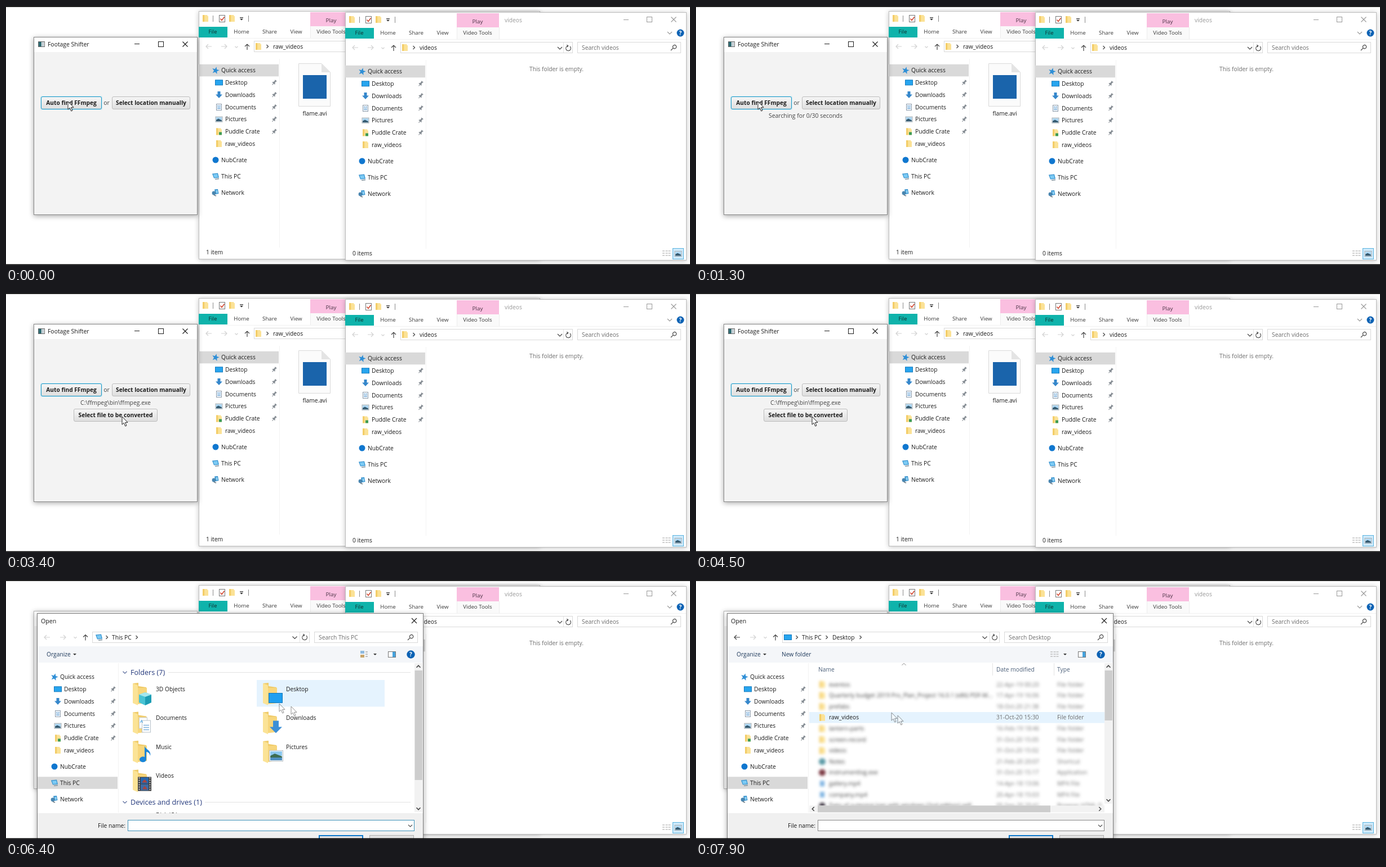
An HTML page that plays this animation: 1214x461 px, repeating every 8 s.

```html
<!DOCTYPE html>
<html lang="en">
<head>
<meta charset="utf-8">
<title>Video conversion demo</title>
<style>
html, body { margin: 0; width: 100%; height: 100%; overflow: hidden; background: #fff; }
svg { display: block; width: 1214px; height: 461px; }
text { font-family: "Open Sans", "Noto Sans", sans-serif; white-space: pre; }
.near { filter: drop-shadow(0 2px 5px rgba(0, 0, 0, .34)); }
.far { filter: drop-shadow(0 1px 4px rgba(0, 0, 0, .24)); }
</style>
</head>
<body>
<svg id="stage" viewBox="0 0 1214 461" xmlns="http://www.w3.org/2000/svg"></svg>
<script>
const LOOP = 8000, STEP = 100;
const INK = '#1c1c1c', GREY = '#6e6e6e', PALE = '#d2d2d2', BLUE = '#1f8fdc';

// Drawing helpers
const rect = (x, y, w, h, fill, line, extra = '') => line
  ? `<rect x="${x + .5}" y="${y + .5}" width="${w - 1}" height="${h - 1}" fill="${fill}" stroke="${line}" ${extra}/>`
  : `<rect x="${x}" y="${y}" width="${w}" height="${h}" fill="${fill}" ${extra}/>`;
const shape = (d, fill) => `<path d="${d}" fill="${fill}"/>`;
const line = (d, color = INK, w = 1, extra = '') => `<path d="${d}" fill="none" stroke="${color}" stroke-width="${w}" ${extra}/>`;
const dot = (x, y, r, fill) => `<circle cx="${x}" cy="${y}" r="${r}" fill="${fill}"/>`;
const text = (x, y, s, { size = 10.25, fill = INK, anchor = 'start', weight = 400, id = '' } = {}) =>
  `<text x="${x}" y="${y + size * .36}" font-size="${size}" fill="${fill}" text-anchor="${anchor}" font-weight="${weight}"${id && ` id="${id}"`}>${s}</text>`;
const mid = (x, y, s, o) => text(x, y, s, { anchor: 'middle', ...o });
const group = (id, body) => `<g id="${id}">${body}</g>`;
const at = (x, y, body) => `<g transform="translate(${x} ${y})">${body}</g>`;

// Controls
const arrow = (x, y, dir, color, id = '') =>
  `<g ${id && `id="${id}"`} transform="translate(${x} ${y}) rotate(${dir})" fill="none" stroke="${color}" stroke-width="1.2"><path d="M-5 0H5M1-4L5 0L1 4"/></g>`;
const chevron = (x, y, dir, color = '#444', s = 3, w = 1.2) =>
  `<path transform="translate(${x} ${y}) rotate(${dir})" d="M${-s / 2} ${-s}L${s / 2} 0L${-s / 2} ${s}" fill="none" stroke="${color}" stroke-width="${w}"/>`;
const caret = (x, y) => shape(`M${x - 3} ${y - 1.5}h6l-3 3z`, '#333');
const cross = (x, y, color) => line(`M${x - 4.5} ${y - 4.5}l9 9m0-9l-9 9`, color, 1.1);
const refresh = (x, y) => line(`M${x + 3} ${y - 3}a4.4 4.4 0 1 1-4-1m-1.8-1.8l2.6 1.6l-1.8 2.4`, '#444', 1.1);
const lens = (x, y) => line(`M${x - 5} ${y + 5}l4.2-4.2a3.2 3.2 0 1 1 .3.3`, '#444', 1.2);
const help = (x, y, r) => dot(x, y, r, '#0b62b4') + mid(x, y, '?', { size: 10, fill: '#fff', weight: 700 });
const listIcon = (x, y) => [-4, 0, 4].map(d => line(`M${x - 7} ${y + d}h4m1.5 0h4m1 0h4`, '#a2a2a2', 1.2)).join('');
const button = (x, y, w, s, focus) =>
  (focus ? rect(x - 1, y - 1, w + 2, 25, '#cdeaf5', '', 'rx="3"') : '') +
  rect(x, y, w, 23, 'url(#btn)', focus ? '#1b97c4' : '#bcbcbc', 'rx="2.5"') +
  mid(x + w / 2, y + 11.5, s, { size: 10.2, weight: 700 });

// Small icons, drawn round their centre
const icon = {
  folder: () => shape('M-5-6h8.5v2h1.5v10H-5z', '#fbe296') + shape('M-5-6h3.2v12H-5z', '#f3cd68'),
  star: () => `<g transform="rotate(14)">${shape('M0-6.4L1.7-2L6.4-1.9L2.7 1.1L4 5.8L0 3.1L-4 5.8L-2.7 1.1L-6.4-1.9L-1.7-2z', '#2f8fd6')}</g>`,
  desktop: () => rect(-7, -5, 14, 10, '#27a5ef', '#1278bd'),
  down: () => shape('M-2.5-6h5V-.5H6L0 6L-6-.5h3.5z', '#3587cb'),
  page: () => rect(-5, -6, 10, 12, '#f8fafc', '#8c9bab') + line('M-3-2.5h2.5m1 0h2.5M-3 0h6M-3 2.5h6', '#4d93cf', 1.2),
  picture: () => rect(-6.5, -5, 13, 10, '#fff', '#9aa5ad') + rect(-5, -3.5, 10, 7, '#a9d5f2') + shape('M-5 3.5V1l4-2.2L5 1.8v1.7z', '#33596f'),
  share: () => icon.folder() + rect(0, 1, 5, 5, '#3d9b55'),
  cloud: () => dot(0, 0, 5.5, '#0f77cf'),
  pc: () => shape('M-6-4.5L4-5.5L6 2.5L-3 3.5z', '#2d8ccb') + shape('M-4.5-3.4L3.2-4.2L4.6 1.6L-2.3 2.4z', '#7ccaf4') + line('M-1 5.2L6 4.4', '#8395a1', 1.6),
  net: () => shape('M-2-5.5L4-6L5.5 2L0 3z', '#2d8ccb') + shape('M0-4L3.4-4.3L4.3 1L1 1.5z', '#8ed0f2') + dot(-3, 1, 3.4, '#4a86b0') + line('M-3 4.5L1 6', '#6c7a84', 1.5),
  film: () => rect(-4, -5, 8, 10, '#7fb4e2'),
  web: () => dot(0, 0, 6, '#5b9aa6'),
  app: () => dot(0, 0, 6, '#7c3a44'),
  dark: () => dot(0, 0, 5.5, '#453d4a')
};
const put = (name, x, y) => at(x, y, icon[name]());
const pin = y => `<g transform="translate(476 ${y}) rotate(40)">${shape('M-2-5h4v1l-.7.6v2.6L3 1v1H.5v3.4h-1V2H-3V1l1.7-1.8v-2.6L-2-4z', '#858c93')}</g>`;

// Navigation pane shared by folder windows and the dialog
const places = [
  ['Quick access', 'star', 114.5], ['Desktop', 'desktop', 136.3, 1], ['Downloads', 'down', 158, 1],
  ['Documents', 'page', 180, 1], ['Pictures', 'picture', 201.7, 1], ['Puddle Crate', 'share', 223.5, 1],
  ['raw_videos', 'folder', 245, 2], ['NubCrate', 'cloud', 274], ['This PC', 'pc', 303], ['Network', 'net', 332]
];
const nav = active => places.map(([name, ic, y, deep]) =>
  (name === active ? rect(342, y - 10.7, 142, 21.5, '#d9d9d9') : '') +
  put(ic, deep ? 378 : 372, y) + text(deep ? 389 : 382, y, name) + (deep === 1 ? pin(y) : '')).join('');

const explorer = (name, status) =>
  rect(342, 9, 606, 442, '#fff', '#bcbcbc', 'class="far"') +
  put('folder', 354, 22) + line('M367.5 17v11M430.5 17v11', '#8a8a8a') +
  rect(378, 16, 11, 13, '#fff', '#777') + line('M380.5 22.5l2.5 3l4.5-6', '#d1452f', 1.6) +
  put('folder', 401, 22) + line('M415 20.5h6') + caret(418, 24) +
  rect(540, 36, 75, 21, '#fafafa') + line('M540.5 36v21M615.5 36v21', '#ececec') +
  rect(540, 11, 75, 25, '#fabfe0') + mid(577, 25, 'Play', { size: 9.8, fill: '#4a3344' }) +
  text(625, 23, name, { fill: '#9a9a9a' }) +
  line('M836 22.5h9', '#999') + rect(877, 17, 10, 10, 'none', '#999') + cross(925, 22, '#999') +
  rect(342, 37, 51, 19, '#0fb3ab') + mid(367, 46, 'File', { size: 9.4, fill: '#102a2a' }) +
  [[418, 'Home'], [468, 'Share'], [515, 'View'], [577, 'Video Tools']].map(([x, s]) => mid(x, 46, s, { size: 9.7, fill: '#3a3a3a' })).join('') +
  chevron(918, 46, 90, '#999', 4) + help(937, 46, 6.5) + line('M343 57.5h604', '#f1f1f1') +
  arrow(360, 72, 180, PALE) + arrow(387, 72, 0, PALE) + chevron(409, 73, 90, PALE, 2.5) + arrow(428, 73, -90, '#444') +
  rect(440, 62, 306, 20, '#fff', '#d9d9d9') + line('M729.5 63v18', '#e3e3e3') +
  put('folder', 448, 72) + chevron(464, 72, 0) + text(474, 72, name) +
  chevron(723, 73, 90, '#444', 4) + refresh(738, 73) +
  rect(754, 62, 184, 20, '#fff', '#d9d9d9') + text(762, 72.5, 'Search ' + name, { fill: GREY }) + lens(925, 72) +
  nav('Quick access') + line('M485.5 94v336', '#f3f3f3') +
  text(355, 438.5, status) + listIcon(912, 438) +
  rect(923, 429, 20, 20, '#cfeafb', '#58b3df') + put('picture', 933, 439);

const flame =
  `<path d="M519.5 102.5H560L575.5 118V178.5H519.5Z" fill="#fbfbfb" stroke="#dadada"/>` +
  shape('M560 102.5V118h15.5z', '#e4e4e4') + rect(527, 123, 42, 42, '#1a64ab') +
  mid(548, 191.5, 'flame.avi');

const mainWin =
  rect(49, 55, 291, 317, '#f3f3f3', '#858585', 'id="frame" class="near"') + rect(50, 56, 289, 26, '#fff') +
  rect(57, 63, 12, 10, '#fff', '#666') + rect(58, 64, 5, 8, '#2e6b73') + rect(64, 64, 3, 8, '#b8c4cb') +
  text(74, 68, 'Footage Shifter', { size: 10.4 }) +
  line('M228 67.5h9') + rect(270, 63, 10, 10, 'none', INK) + cross(318, 68, INK) +
  button(62, 161, 108, 'Auto find FFmpeg', true) + mid(178.5, 172.5, 'or', { size: 10.4, fill: '#444' }) +
  button(188, 161, 139, 'Select location manually') +
  mid(194.5, 195, '', { size: 10.4, fill: '#444', id: 'status' }) +
  group('pick', button(120, 206, 149, 'Select file to be converted'));

// Dialog contents
const heading = (y, s, x) => chevron(211, y, 90, '#5a6b9c', 3.5) + text(221, y, s, { size: 12.6, fill: '#24397c' }) + line(`M${x} ${y}H718`, '#e2e2e2');
const bigFolder = shape('M0 1L10 0v6l14 2v28L3 37L0 35z', '#efca67') + shape('M0 1l9 3v36L0 36z', '#fbe396') + shape('M9 9h16v27l-16 2z', '#f7d67c');
const overlay = {
  '3D Objects': shape('M22 17l11 4v14l-11 5l-11-5V21z', '#49c3d4') + shape('M22 25l11-4v14l-11 5z', '#1d9db4') + shape('M22 17l11 4l-11 4l-11-4z', '#a5e7ee'),
  Desktop: rect(10, 18, 25, 18, '#1f9ff0', '#1478ba'),
  Documents: rect(11, 10, 15, 20, '#fff', '#c3ccd4') + rect(16, 15, 16, 22, '#fff', '#b6c1ca') + text(13, 17, 'A', { size: 8, fill: BLUE }) + line('M19 24h10M19 28h10M19 32h10', '#7fb2dc', 1.5),
  Downloads: shape('M18 16h10v11h6L23 38L12 27h6z', '#3d8fd6'),
  Music: shape('M21 9c1 7 12 7 10 18c-1-5-4-7-7-7v13a6 5 0 1 1-3-4z', '#1a86d9'),
  Pictures: rect(11, 17, 25, 20, '#fff', '#b4bdc3') + rect(13, 19, 21, 8, '#8dc8ef') + shape('M13 27l8-4l13 5v3H13z', '#3d6d52') + rect(13, 30, 21, 5, '#4f8fc0'),
  Videos: rect(9, 13, 24, 25, '#3a3a3a') + line('M11.5 14v23M30.5 14v23', '#ddd', 2, 'stroke-dasharray="2 2"') + rect(14, 14, 14, 11, '#2767ad') + rect(14, 26, 14, 11, '#3f6ba3') + shape('M16 23l5-6l5 6zM17 35l4-6l5 6z', '#a8443e')
};
const tiles = Object.keys(overlay).map((name, i) => {
  const x = i % 2 ? 456 : 225, y = 183 + 51.5 * (i >> 1);
  return at(x, y, bigFolder + overlay[name]) + text(x + 41, y + 11, name);
}).join('');
const vbar = (h, thumb, ends) => rect(725, 148, 14, h, '#f2f2f2') + rect(725.5, 161, 13.5, thumb, '#cdcdcd') +
  (ends ? chevron(732, 154, -90, '#444', 3.5, 1.6) + chevron(732, 148 + h - 6, 90, '#444', 3.5, 1.6) : '');
const folders = heading(164.5, 'Folders (7)', 288) + group('hover', rect(445, 178, 227, 47.5, '#e5f3fe')) + tiles +
  heading(395.5, 'Devices and drives (1)', 353) +
  `<g clip-path="url(#pane)">${text(266, 418.5, 'Disk (C:)')}</g>` + vbar(265, 195, true);

const columns = [[217, 'Name'], [533, 'Date modified'], [641, 'Type']].map(([x, s]) => text(x, 159, s, { fill: '#4c607a' })).join('') +
  line('M526.5 148v22M635.5 148v22', '#e3e3e3') + chevron(369, 150, -90, '#888', 3.5, 1);

const kinds = { folder: 'File folder', web: 'Shortcut', app: 'Application', film: 'MP4 File', dark: 'Browser HTML D' };
const files = [
  ['eventos', 'folder', '22-Apr-19 00:20'], ['Quarterly budget 2019 Pro_Plan_Project 16.0.1 (x86) PDF-M...', 'folder', '17-Apr-19 16:06'],
  ['prefabs', 'folder', '18-Oct-20 21:38'], ['raw_videos', 'folder', '31-Oct-20 15:30'],
  ['lantern-parts', 'folder', '16-Feb-19 18:46'], ['screen-record', 'folder', '31-Oct-20 15:05'], ['videos', 'folder', '31-Oct-20 15:02'],
  ['Notes', 'web', '21-Feb-20 20:07'], ['instrumentlog.exe', 'app', '31-Oct-20 15:17'],
  ['gallery.mp4', 'film', '14-Apr-18 13:06'], ['company.mp4', 'film', '20-Apr-18 15:03'],
  ['Data of outgoing logs with windows (2nd edition) self...', 'dark', '05-Sep-20 20:41']
];
const fileRow = ([name, kind, date], i) => {
  const y = 186 + 19.6 * i, clear = name === 'raw_videos', o = { fill: clear ? GREY : '#777' };
  const row = put(kind, 224, y) + text(236, y, name, { fill: clear ? INK : '#444' }) + text(533, y, date, o) + text(641, y, kinds[kind], o);
  return clear ? rect(201, y - 9.8, 524, 19.6, '#e5f3fe') + row : `<g filter="url(#soft)">${row}</g>`;
};
const hbar = (y, w) => rect(201, y, w, 12, '#f2f2f2') + rect(216, y, 413, 12, '#cdcdcd') + chevron(208, y + 6, 180, '#444', 3.5, 1.6) + chevron(717, y + 6, 0, '#555', 3.5, 1.6);

const dialog =
  rect(55, 59, 686, 440, '#fff', '#7c7c7c', 'class="near"') +
  text(62, 73, 'Open', { size: 10.6 }) + cross(724.5, 72.5, INK) +
  arrow(73, 102, 180, PALE, 'back') + arrow(101, 102, 0, PALE) + chevron(123, 102.5, 90, PALE, 2.5) + arrow(141, 102.5, -90, '#444') +
  rect(153, 92, 386, 20, '#fff', '#d9d9d9') + line('M521.5 93v18', '#e3e3e3') +
  group('pcIcon', put('pc', 165, 102)) + group('deskIcon', put('desktop', 163, 102)) +
  chevron(179, 102, 0) + text(188, 102, 'This PC') + group('more', chevron(232, 102, 0)) +
  group('crumb', text(242, 102, 'Desktop') + chevron(292, 102, 0)) +
  chevron(512.5, 102.5, 90, '#444', 4) + refresh(530, 102) +
  rect(547, 92, 184, 20, '#fff', '#d9d9d9') + text(555, 102.5, '', { fill: GREY, id: 'search' }) + lens(718, 102) +
  rect(56, 118, 684, 29, '#f4f6f9') + text(72, 132.5, 'Organize', { fill: '#1e395b' }) + caret(122, 132.5) +
  group('newDir', text(152, 132.5, 'New folder', { fill: '#1e395b' })) +
  group('tileIcon', rect(629, 126, 7, 5, '#8fbbe0') + rect(629, 133, 7, 5, '#c9a56a') + line('M638 128h4M638 132h4M638 136h4', '#888')) +
  group('rowIcon', listIcon(636, 132)) + caret(655, 132.5) +
  rect(678, 127, 14, 11, '#fff', '#777') + rect(686, 128, 5, 9, '#46a3de') + help(718.5, 132.5, 7.2) +
  at(-286, 58, nav('This PC')) + line('M199.5 148v266', '#f3f3f3') +
  group('tiles', folders) + group('head', columns) +
  group('pending', rect(725.5, 162, 14, 222, '#f6f6f6') + rect(725.5, 162, 14, 88, '#d5d5d5') + hbar(401.5, 538) + rect(629, 401.5, 25, 12, '#e2e0de') + chevron(732, 407.5, 0, '#444', 3.5, 1.6)) +
  group('list', `<g clip-path="url(#rows)">${files.map(fileRow).join('')}</g>` + vbar(250, 89, true) + hbar(401.5, 524)) +
  mid(470.5, 168.5, 'Working on it...', { fill: GREY, id: 'wait' }) +
  rect(56, 415, 684, 60, '#f0f0f0') + text(212, 437, 'File name:', { anchor: 'end' }) +
  rect(216, 427, 509, 20, '#fff', '#3c91b8', 'id="field"') + chevron(717.5, 437.5, 90, '#555', 3.5) +
  group('caret', line('M219.5 430v14')) +
  rect(555.5, 454.5, 78, 20, '#e4e4e4', '#0d78cc', 'stroke-width="2"') + rect(645, 454, 79, 20, '#e1e1e1', '#b0b0b0');

const pointer = id => `<path id="${id}" d="M0 0V14.2L3.2 11.2L5.7 17L8 16L5.6 10.4H10Z" fill="#fff" stroke="#222"/>`;

const stage = document.getElementById('stage');
stage.innerHTML = `<defs>
  <linearGradient id="btn" x2="0" y2="1"><stop stop-color="#f6f6f6"/><stop offset="1" stop-color="#dedede"/></linearGradient>
  <filter id="soft" x="-5%" y="-60%" width="110%" height="220%"><feGaussianBlur stdDeviation="2.8"/></filter>
  <clipPath id="pane"><rect x="200" y="147" width="525" height="268"/></clipPath>
  <clipPath id="rows"><rect x="200" y="171" width="525" height="231"/></clipPath></defs>` +
  rect(0, 0, 1214, 461, '#fff') + explorer('raw_videos', '1 item') + flame +
  at(260, 2, explorer('videos', '0 items')) + mid(977, 112.5, 'This folder is empty.', { fill: GREY }) +
  mainWin + group('dialog', dialog) + pointer('trail') + pointer('tip') +
  rect(0, 0, 1214, 1.7, '#000') + rect(0, 459.6, 1214, 1.4, '#000');

const $ = id => document.getElementById(id);
const show = (id, on) => { $(id).style.display = on ? '' : 'none'; };

// Pointer stops: time, x, y
const path = [
  [0, 110, 170], [2200, 110, 170], [3000, 206, 220], [6050, 206, 220], [6350, 506, 225],
  [6400, 485, 220], [6500, 480, 213], [7600, 480, 213], [7850, 358, 241], [7900, 347, 236], [8000, 330, 236]
];
function pointAt(t) {
  const i = Math.max(1, path.findIndex(p => p[0] >= t));
  const [t0, x0, y0] = path[i - 1], [t1, x1, y1] = path[i];
  const k = Math.max(0, (t - t0) / (t1 - t0)), e = k * k * (3 - 2 * k);
  return [x0 + (x1 - x0) * e, y0 + (y1 - y0) * e];
}

const SEARCH = 500, FOUND = 2000, OPEN = 4700, TILES = 5600, ENTER = 7200, LIST = 7600;

function draw(t) {
  const found = t >= FOUND, open = t >= OPEN, listed = t >= LIST;
  const tiled = t >= TILES && t < ENTER, entering = t >= ENTER && !listed;
  $('status').textContent = found ? 'C:\\ffmpeg\\bin\\ffmpeg.exe'
    : t >= SEARCH ? `Searching for ${Math.floor((t - SEARCH) / 1000)}/30 seconds` : '';
  show('pick', found);
  $('frame').setAttribute('class', open ? 'far' : 'near');
  $('frame').setAttribute('stroke', open ? '#b4b4b4' : '#858585');
  show('dialog', open);
  show('tiles', tiled);
  show('hover', t >= 6300);
  show('head', t >= ENTER);
  show('pending', entering);
  show('list', listed);
  show('wait', t < TILES || entering);
  $('wait').setAttribute('y', entering ? 195.2 : 172.2);
  show('pcIcon', !listed);
  show('deskIcon', listed);
  show('crumb', listed);
  show('newDir', listed);
  show('more', t >= TILES);
  show('tileIcon', t < ENTER);
  show('rowIcon', t >= ENTER);
  show('caret', t < TILES);
  $('search').textContent = listed ? 'Search Desktop' : 'Search This PC';
  $('back').setAttribute('stroke', listed ? '#444' : PALE);
  $('field').setAttribute('stroke', listed ? '#858585' : '#3c91b8');

  // A moving pointer leaves a half-blended double
  const a = pointAt(t - 50), b = pointAt(t), moving = Math.hypot(a[0] - b[0], a[1] - b[1]) > .5;
  show('trail', moving);
  $('trail').setAttribute('transform', `translate(${a})`);
  $('tip').setAttribute('transform', `translate(${b})`);
  for (const id of ['trail', 'tip']) $(id).setAttribute('opacity', moving ? .5 : 1);
}

const start = performance.now();
function tick() {
  const t = (performance.now() - start) % LOOP;
  draw(Math.floor(t / STEP) * STEP);
  requestAnimationFrame(tick);
}
tick();
</script>
</body>
</html>
```
